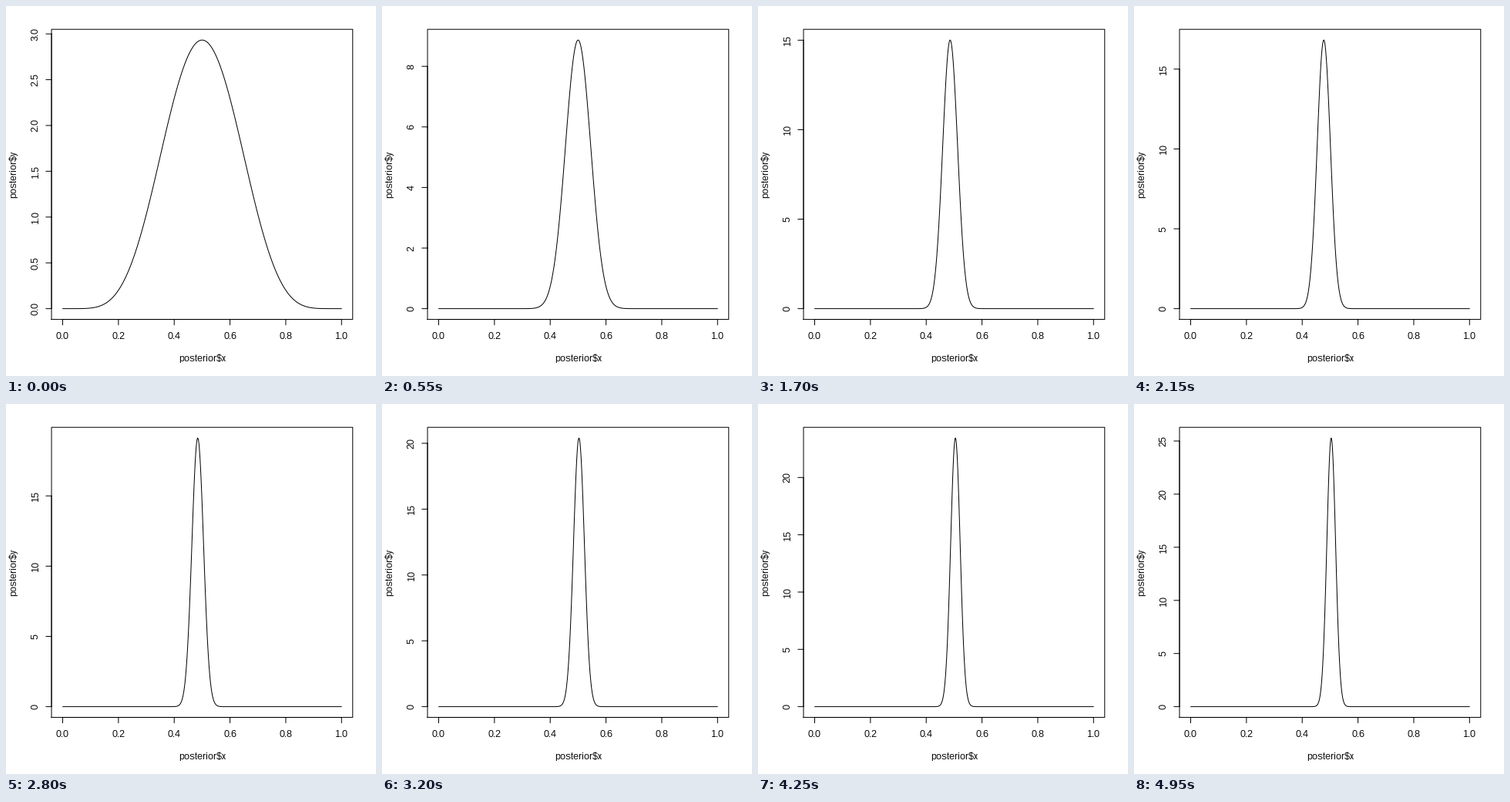
Write a matplotlib script that moves like this. It is 480 by 480 pixels and loops after 5 s.

```python
import numpy as np
import matplotlib.pyplot as plt
from matplotlib.animation import FuncAnimation

plt.rcParams.update({
    "font.family": "Liberation Sans",
    "font.size": 12,
    "text.hinting": "default",
    "text.hinting_factor": 1,
    "path.simplify": False,
    "toolbar": "None",
})

SIZE, FRAMES, STEP_MS = 480, 100, 50
LINE = 14.4                                   # height of one margin line
LEFT, RIGHT = 4.1 * LINE, SIZE - 2.1 * LINE
TOP, BOTTOM = 2.1 * LINE, SIZE - 5.1 * LINE
TICK = LINE / 2
FLIPS = 10                                    # coin flips added per frame

# Frame -> heads counted so far, plus one from the prior
KNOTS = {0: 6, 11: 61, 25: 128, 43: 211, 56: 277, 73: 376, 99: 505}

PAD = 0.04 / 1.08                             # axis ranges are padded by 4 %
X0, X_SPAN = LEFT + PAD * (RIGHT - LEFT), (RIGHT - LEFT) / 1.08
Y0, Y_SPAN = BOTTOM - PAD * (BOTTOM - TOP), (BOTTOM - TOP) / 1.08


def count_heads():
    """Shuffled flips, ten per frame, passing through every knot."""
    rng = np.random.default_rng(4)
    frames = list(KNOTS)
    heads = [KNOTS[0]]
    for a, b in zip(frames, frames[1:]):
        flips = np.arange((b - a) * FLIPS) < KNOTS[b] - KNOTS[a]
        steps = rng.permutation(flips).reshape(-1, FLIPS).sum(axis=1)
        heads.extend(heads[-1] + np.cumsum(steps))
    return heads


HEADS = count_heads()
GRID = np.linspace(0, 1, 1001)
SAFE = np.clip(GRID, 1e-12, 1 - 1e-12)
LOG_X, LOG_REST = np.log(SAFE), np.log(1 - SAFE)


def posterior(i):
    """Beta posterior scaled to a peak of 1, and its true peak density."""
    k = HEADS[i]
    n = FLIPS * (i + 1) + 2
    log_y = k * LOG_X + (n - k) * LOG_REST
    shape = np.exp(log_y - log_y.max())
    return shape, 1 / (shape.sum() * (GRID[1] - GRID[0]))


def tick_values(peak):
    """Round tick values for a range from 0 to peak."""
    cell = 1.08 * peak / 5
    base = 10.0 ** np.floor(np.log10(cell))
    unit = base
    for factor, bias in ((2, 0.8), (5, 1.7), (10, 0.8)):
        if factor * base - cell >= bias * (cell - unit):
            break
        unit = factor * base
    ticks = np.arange(0, np.floor(1.04 * peak / unit) + 1) * unit
    return ticks, "{:.1f}" if unit < 1 else "{:.0f}"


def axis_path(at, edge, out):
    """Axis line between the end ticks, then each tick, split by gaps."""
    along, across = [at[0], at[-1], np.nan], [edge, edge, np.nan]
    for p in at:
        along += [p, p, np.nan]
        across += [edge, edge + out, np.nan]
    return along, across


fig = plt.figure(figsize=(SIZE / 72, SIZE / 72), dpi=72, facecolor="white")
ax = fig.add_axes([0, 0, 1, 1])
ax.set_xlim(0, SIZE)
ax.set_ylim(SIZE, 0)
ax.axis("off")


def stroke(x=(), y=(), join="round", cap="round"):
    return ax.plot(x, y, color="black", lw=1, snap=False, clip_on=False,
                   solid_joinstyle=join, solid_capstyle=cap)[0]


def label(x, y, text="", angle=0):
    return ax.text(x, y, text, color="black", ha="center", va="baseline",
                   rotation=angle, rotation_mode="anchor")


curve = stroke()
x_ticks = np.linspace(0, 1, 6)
stroke(*axis_path(X0 + x_ticks * X_SPAN, BOTTOM, TICK))
y_axis = stroke()
stroke([LEFT, RIGHT, RIGHT, LEFT, LEFT], [BOTTOM, BOTTOM, TOP, TOP, BOTTOM],
       join="miter", cap="projecting")

for t in x_ticks:
    label(X0 + t * X_SPAN, BOTTOM + 1.8 * LINE, f"{t:.1f}")
label((LEFT + RIGHT) / 2, BOTTOM + 3.8 * LINE, r"posterior\$x")
label(LEFT - 3.2 * LINE, (TOP + BOTTOM) / 2, r"posterior\$y", 90)
y_labels = [label(LEFT - 1.2 * LINE, Y0, "", 90) for _ in range(9)]


def draw(i):
    shape, peak = posterior(i)
    curve.set_data(X0 + GRID * X_SPAN, Y0 - shape * Y_SPAN)

    ticks, form = tick_values(peak)
    at = Y0 - ticks / peak * Y_SPAN
    along, across = axis_path(at, LEFT, -TICK)
    y_axis.set_data(across, along)
    for j, text in enumerate(y_labels):
        shown = j < len(ticks)
        text.set_visible(shown)
        if shown:
            text.set_y(at[j])
            text.set_text(form.format(ticks[j]))
    return [curve, y_axis, *y_labels]


anim = FuncAnimation(fig, draw, frames=FRAMES, interval=STEP_MS,
                     init_func=lambda: draw(0), repeat=True, repeat_delay=0)
plt.show()
```
